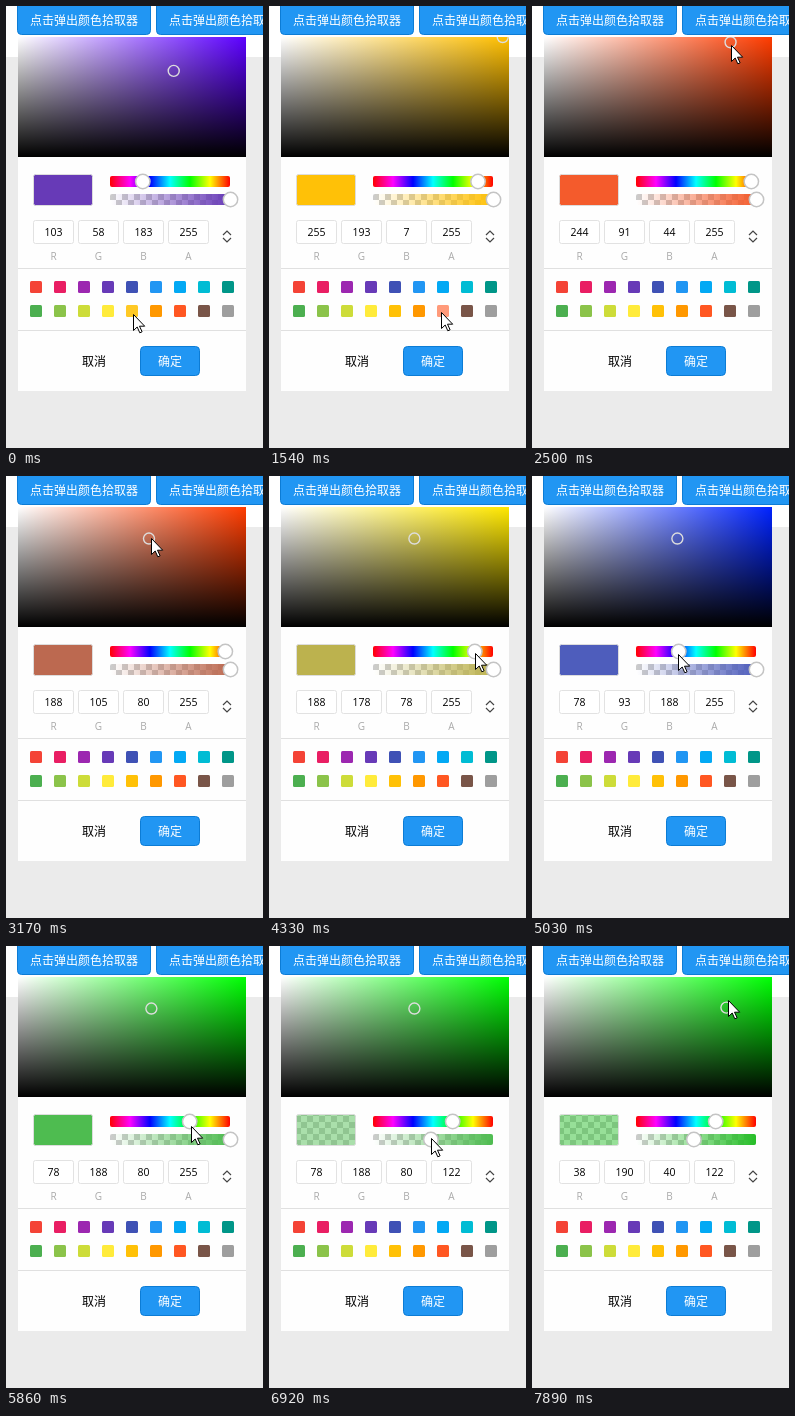
These frames come from a looping animation (257 by 442 pixels, 8000 ms). An HTML page:

```html
<!DOCTYPE html>
<html lang="zh">
<head>
<meta charset="utf-8">
<style>
html, body { margin: 0; width: 100%; height: 100%; overflow: hidden; background: #ebebeb; }
svg { display: block; width: 257px; height: 442px; }
text { font: 10.5px "Open Sans", "Noto Sans", sans-serif; text-anchor: middle; fill: #000; }
.zh { font: 12px "Noto Sans CJK SC", "Noto Sans CJK", sans-serif; }
.on { fill: #fff; }
.label { font-size: 10px; fill: #aaa; }
.button { fill: #2196f3; stroke: #0c7cd5; }
.knob { fill: #fff; stroke: #c4c4c4; stroke-width: 1.5; }
.line { stroke: #e0e0e0; }
</style>
</head>
<body>
<svg viewBox="0 0 257 442">
  <defs>
    <linearGradient id="white"><stop stop-color="#fff"/><stop offset="1" stop-color="#fff" stop-opacity="0"/></linearGradient>
    <linearGradient id="black" x2="0" y2="1"><stop stop-opacity="0"/><stop offset="1"/></linearGradient>
    <linearGradient id="hues"></linearGradient>
    <linearGradient id="fade"><stop class="tint" stop-opacity="0"/><stop class="tint" offset="1"/></linearGradient>
    <pattern id="check" x="104" y="188" width="12" height="12" patternUnits="userSpaceOnUse">
      <path d="M0 0h12v12h-12z" fill="#fff"/><path d="M0 0h6v6h-6zM6 6h6v6h-6z" fill="#ccc"/>
    </pattern>
    <clipPath id="area"><path d="M12 31h228v120h-228z"/></clipPath>
  </defs>

  <path d="M0 0h257v51h-257z" fill="#fff"/>
  <path d="M12 30h228v355h-228z" fill="#fefefe"/>
  <rect class="button" x="11.5" y="-4.5" width="133" height="33" rx="4"/>
  <rect class="button" x="150.5" y="-4.5" width="133" height="33" rx="4"/>
  <text class="zh on" x="78" y="19">点击弹出颜色拾取器</text>
  <text class="zh on" x="217" y="19">点击弹出颜色拾取器</text>

  <g clip-path="url(#area)">
    <rect id="pure" x="12" y="31" width="228" height="120"/>
    <rect x="12" y="31" width="228" height="120" fill="url(#white)"/>
    <rect x="12" y="31" width="228" height="120" fill="url(#black)"/>
    <circle id="ring" r="5.5" fill="none" stroke="#ddd" stroke-width="1.4"/>
  </g>

  <rect x="27.5" y="168.5" width="59" height="31" rx="2" fill="url(#check)"/>
  <rect id="preview" x="27.5" y="168.5" width="59" height="31" rx="2" stroke="#ddd"/>
  <rect x="104" y="170" width="120" height="11" rx="2" fill="url(#hues)"/>
  <rect x="104" y="188" width="120" height="11" rx="2" fill="url(#check)"/>
  <rect x="104" y="188" width="120" height="11" rx="2" fill="url(#fade)"/>
  <circle id="hueKnob" class="knob" cy="175.5" r="7.2"/>
  <circle id="alphaKnob" class="knob" cy="193.5" r="7.2"/>

  <g id="fields"></g>
  <path d="M217 229l4-4 4 4M217 232l4 4 4-4" fill="none" stroke="#444" stroke-width="1.2"/>
  <path class="line" d="M12 262.5h228M12 324.5h228"/>
  <g id="swatches"></g>

  <text class="zh" x="88" y="360">取消</text>
  <rect class="button" x="134.5" y="340.5" width="59" height="29" rx="4"/>
  <text class="zh on" x="164" y="360">确定</text>
  <path id="cursor" d="M.5 .5v16l3.7-3.5 2.6 5.8 2.3-1-2.6-5.6h5.2z" fill="#fff" stroke="#000"/>
</svg>
<script>
const $ = id => document.getElementById(id);
const set = (el, attrs) => { for (const k in attrs) el.setAttribute(k, attrs[k]); };

const palette = ('f44336 e91e63 9c27b0 673ab7 3f51b5 2196f3 03a9f4 00bcd4 009688 ' +
  '4caf50 8bc34a cddc39 ffeb3b ffc107 ff9800 ff5722 795548 9e9e9e').split(' ');
$('swatches').innerHTML = palette.map((c, i) =>
  `<rect x="${24 + i % 9 * 24}" y="${i < 9 ? 275 : 299}" width="12" height="12" rx="1.5" fill="#${c}"/>`).join('');
$('fields').innerHTML = [...'RGBA'].map((c, i) => {
  const x = 27.5 + i * 45;
  return `<rect x="${x}" y="214.5" width="40" height="23" rx="2" fill="#fff" stroke="#e2e2e2"/>
    <text class="value" x="${x + 20}" y="230"></text><text class="label" x="${x + 20}" y="254">${c}</text>`;
}).join('');
$('hues').innerHTML = [0, 1, 2, 3, 4, 5, 6].map(i =>
  `<stop offset="${i / 6}" stop-color="hsl(${360 - i * 60},100%,50%)"/>`).join('');
const values = document.querySelectorAll('.value');
const tints = document.querySelectorAll('.tint');
const swatches = [...$('swatches').children];

// The picture steps every STEP ms, counted anew from each burst of motion
const STEP = 134;
const bursts = [0, 580, 1540, 2500, 3600, 4330, 5430, 6530, 7310];

// Pointer x, y; hue, saturation, value, alpha; opacity of the hovered swatch
const start = { x: 127, y: 308, h: 261.6, s: .683, v: .7176, a: 1, hover: .88 };
const moves = [
  [580, 580, { h: 45, s: .9725, v: 1, hover: .6 }],
  [650, 1110, { x: 172, y: 306 }],
  [1674, 1674, { h: 14, s: .867 }],
  [1674, 2200, { x: 210, y: 34 }],
  [2366, 3170, { x: 145, y: 62, s: .5745, v: .7373 }],
  [3170, 3438, { x: 243, y: 144, s: .585 }],
  [3466, 3868, { x: 220, y: 176 }],
  [4196, 4598, { x: 177, y: 178, h: 135.8 }],
  [4598, 5000, { x: 146, h: 231.8 }],
  [5000, 5268, { x: 139, h: 252 }],
  [5296, 5832, { x: 185, y: 180, h: 120.9 }],
  [5966, 6234, { x: 221, y: 192 }],
  [6396, 6798, { x: 162, a: .478 }],
  [6798, 7066, { x: 146, y: 62 }],
  [7176, 7578, { x: 212, y: 58, s: .87 }],
  [7578, 7846, { x: 196, y: 54, s: .8, v: .745 }],
];

function pose(t) {
  const p = { ...start };
  for (const [from, to, goal] of moves) {
    if (t < from) break;
    const k = t >= to ? 1 : (t - from) / (to - from);
    for (const key in goal) p[key] += (goal[key] - p[key]) * k;
  }
  return p;
}

function rgb(h, s, v) {
  return [5, 3, 1].map(n => {
    const k = (n + h / 60) % 6;
    return Math.round(255 * v * (1 - s * Math.max(0, Math.min(k, 4 - k, 1))));
  });
}

function draw(now) {
  const time = now % 8000;
  const burst = bursts.findLast(b => b <= time);
  const { x, y, h, s, v, a, hover } = pose(burst + Math.floor((time - burst) / STEP) * STEP);
  const color = rgb(h, s, v);

  set($('pure'), { fill: `rgb(${rgb(h, 1, 1)})` });
  set($('ring'), { cx: 12 + 228 * s, cy: 31 + 120 * (1 - v) });
  set($('preview'), { fill: `rgb(${color})`, 'fill-opacity': a });
  set($('hueKnob'), { cx: 224 - h / 3 });
  set($('alphaKnob'), { cx: 104.5 + 120 * a });
  tints.forEach(el => set(el, { 'stop-color': `rgb(${color})` }));
  [...color, Math.round(a * 255)].forEach((n, i) => values[i].textContent = n);
  swatches.forEach((el, i) => {
    const dx = x - 24 - i % 9 * 24, dy = y - (i < 9 ? 275 : 299);
    const over = dx >= 0 && dx < 12 && dy >= 0 && dy < 12;
    set(el, { opacity: over ? hover : 1 });
  });
  set($('cursor'), { transform: `translate(${Math.round(x)} ${Math.round(y)})` });
  requestAnimationFrame(draw);
}
requestAnimationFrame(draw);
</script>
</body>
</html>
```
